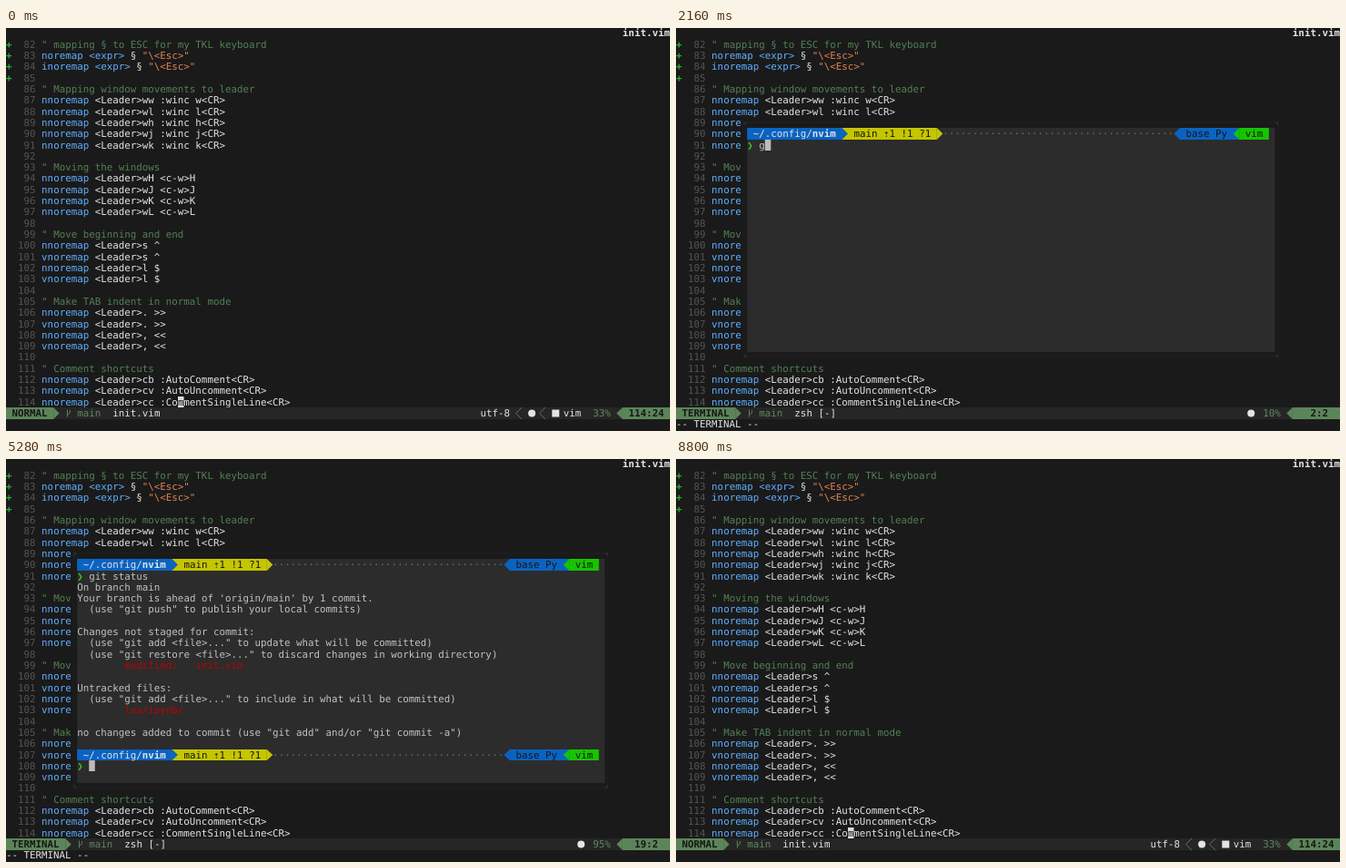
Recreate the animation shown at these times as an HTML page. Size 730 px wide and 444 px high, loop 8880 ms.

```html
<!DOCTYPE html>
<html lang="en">
<head>
<meta charset="utf-8">
<title>Popup terminal in an editor</title>
<style>
html, body { margin: 0; width: 100%; height: 100%; overflow: hidden; background: #1a1a1a; }
svg { display: block; width: 730px; height: 444px; }
text {
  font: 10.827px "DejaVu Sans Mono", "Liberation Mono", monospace;
  white-space: pre;
  text-rendering: geometricPrecision;
  fill: #e4e4e4;
}
.num { fill: #545454; }
.comment { fill: #538053; }
.key { fill: #5fafff; }
.str { fill: #e08255; }
.sign { fill: #2fae2f; font-weight: 700; }
.green { fill: #5f875f; }
.bold { font-weight: 700; }
.dark { fill: #161616; }
.out { fill: #c2c2c2; }
.red { fill: #c00000; }
.dots { fill: #6c6c6c; }
.chevron { fill: #3fc81c; font-weight: 700; }
</style>
</head>
<body>
<svg id="stage" viewBox="0 0 730 444" xmlns="http://www.w3.org/2000/svg"></svg>
<script>
// Text grid: cell width, row pitch, top of row 0 and its baseline
const LOOP = 8880, CW = 730 / 112, RH = 12.31, TOP = -.3, BASE = 9.44;
const BG = '#1a1a1a', BAR = '#262626', MOSS = '#5b8559';
const BLUE = '#0a63c2', YELLOW = '#c5c500', LIME = '#16c400', PANEL = '#2c2c2c';

// Key moments in ms
const OPEN = 1040, PROMPT = 1280, INSERT = 1600, TYPE = 2160, KEY = 160,
      ENTER = 3760, OUTPUT = 3840, REFRESH = 4320, CLOSE = 5680;

const esc = s => s.replace(/&/g, '&amp;').replace(/</g, '&lt;');
const x = col => (col * CW).toFixed(2);
const y = row => Math.round(row * RH + TOP);
const mid = row => (y(row) + y(row + 1)) / 2;

const span = (s, cls) => `<tspan class="${cls}">${esc(s)}</tspan>`;
const line = (row, col, inner, cls = '') =>
  `<text x="${x(col)}" y="${Math.round(row * RH + BASE)}" class="${cls}">${inner}</text>`;
const put = (row, col, s, cls) => line(row, col, esc(s), cls);
const box = (row, col, cols, rows, fill) =>
  `<rect x="${x(col)}" y="${y(row)}" width="${x(cols)}" height="${y(row + rows) - y(row)}" fill="${fill}"/>`;
const wedge = (row, base, tip) =>
  `M${x(base)} ${y(row)}L${x(tip)} ${mid(row)}L${x(base)} ${y(row + 1)}`;
const arrowRight = (row, col, fill) => `<path d="${wedge(row, col, col + 1)}z" fill="${fill}"/>`;
const arrowLeft = (row, col, fill) => `<path d="${wedge(row, col + 1, col)}z" fill="${fill}"/>`;
const thinLeft = (row, col) =>
  `<path d="${wedge(row, col + 1, col)}" fill="none" stroke="${MOSS}" stroke-width=".9"/>`;
const group = (id, inner) => `<g id="${id}">${inner}</g>`;

const source = `" mapping § to ESC for my TKL keyboard
noremap <expr> § "\\<Esc>"
inoremap <expr> § "\\<Esc>"

" Mapping window movements to leader
nnoremap <Leader>ww :winc w<CR>
nnoremap <Leader>wl :winc l<CR>
nnoremap <Leader>wh :winc h<CR>
nnoremap <Leader>wj :winc j<CR>
nnoremap <Leader>wk :winc k<CR>

" Moving the windows
nnoremap <Leader>wH <c-w>H
nnoremap <Leader>wJ <c-w>J
nnoremap <Leader>wK <c-w>K
nnoremap <Leader>wL <c-w>L

" Move beginning and end
nnoremap <Leader>s ^
vnoremap <Leader>s ^
nnoremap <Leader>l $
vnoremap <Leader>l $

" Make TAB indent in normal mode
nnoremap <Leader>. >>
vnoremap <Leader>. >>
nnoremap <Leader>, <<
vnoremap <Leader>, <<

" Comment shortcuts
nnoremap <Leader>cb :AutoComment<CR>
nnoremap <Leader>cv :AutoUncomment<CR>
nnoremap <Leader>cc :CommentSingleLine<CR>`.split('\n');

function paintCode(s) {
  if (s[0] === '"') return span(s, 'comment');
  return s.split(/(^\w+|<expr>|".*")/).map(part =>
    part[0] === '"' ? span(part, 'str')
      : /^(\w*noremap|<expr>)$/.test(part) ? span(part, 'key')
      : esc(part)).join('');
}

function editor() {
  const rows = source.map((s, i) =>
    (i < 4 ? put(i + 1, 0, '+', 'sign') : '') +
    put(i + 1, 2, String(82 + i).padStart(3), 'num') +
    line(i + 1, 6, paintCode(s)));
  return put(0, 104, 'init.vim', 'bold') + rows.join('');
}

const branch = col => {
  const cx = (col + .35) * CW, top = y(34);
  return `<path d="M${cx} ${top + 2.5}v8M${cx + 3} ${top + 3}v2q0 1.5 -3 3" fill="none" stroke="${MOSS}"/>`;
};
const badge = col =>
  `<circle cx="${x(col + .7)}" cy="${mid(34)}" r="4" fill="#e4e4e4"/>`;

function status(mode, file, percent, extra) {
  const w = mode.length + 2;
  return box(34, 0, 112, 1, BAR) + box(34, 0, w, 1, MOSS) + arrowRight(34, w, MOSS) +
    put(34, 1, mode, 'bold dark') + branch(w + 2) + put(34, w + 4, 'main', 'green') +
    put(34, w + 10, file) + extra + put(34, 99, percent, 'green') +
    box(34, 104, 8, 1, MOSS) + arrowLeft(34, 103, MOSS);
}

const fileInfo = put(34, 80, 'utf-8') + thinLeft(34, 86) + badge(88) + thinLeft(34, 90) +
  `<rect x="${x(92.1)}" y="${mid(34) - 4}" width="8" height="8" fill="#e4e4e4"/>` + put(34, 94, 'vim');

function prompt(row, full) {
  const from = full ? 45 : 29, to = full ? 84 : 94;
  const git = box(row, 28, 16, 1, YELLOW) + arrowRight(row, 44, YELLOW) +
    put(row, 30, 'main ⇡1 !1 ?1', 'dark') +
    arrowLeft(row, 84, BLUE) + box(row, 85, 10, 1, BLUE) + put(row, 86, 'base Py', 'dark');
  return put(row, from, '·'.repeat(to - from), 'dots') + (full ? git : '') +
    box(row, 12, 16, 1, BLUE) + arrowRight(row, 28, BLUE) +
    line(row, 13, '~/.config/' + span('nvim', 'bold')) +
    arrowLeft(row, 94, LIME) + box(row, 95, 5, 1, LIME) + put(row, 96, 'vim', 'dark') +
    put(row + 1, 12, '❯', 'chevron');
}

function frame() {
  const l = 11.5 * CW, r = 101.5 * CW, t = mid(8), b = mid(29) - 1;
  return box(8, 11, 91, 22, BG) + box(9, 12, 89, 20, PANEL) +
    `<rect x="${l}" y="${t}" width="${r - l}" height="${b - t}" rx="2" fill="none" stroke="#202020"/>` +
    `<path d="M${l} ${t + 3}v-3h3M${r - 3} ${t}h3v3M${l} ${b - 3}v3h3M${r - 3} ${b}h3v-3" fill="none" stroke="#3c3c3c" stroke-width=".8"/>`;
}

const report = `On branch main
Your branch is ahead of 'origin/main' by 1 commit.
  (use "git push" to publish your local commits)

Changes not staged for commit:
  (use "git add <file>..." to update what will be committed)
  (use "git restore <file>..." to discard changes in working directory)
        modified:   init.vim

Untracked files:
  (use "git add <file>..." to include in what will be committed)
        lua/ipynb/

no changes added to commit (use "git add" and/or "git commit -a")`.split('\n');

const output = report.map((s, i) => put(11 + i, 12, s, /^ {8}/.test(s) ? 'red' : 'out')).join('');

const stage = document.getElementById('stage');
stage.innerHTML = `<rect width="730" height="444" fill="${BG}"/>` + editor() +
  group('fileCursor', box(33, 29, 1, 1, '#dedede') + put(33, 29, 'm', 'dark')) +
  group('popup', frame() +
    group('barePrompt', prompt(9, false)) +
    group('fullPrompt', prompt(9, true)) +
    put(10, 14, '', 'out').replace('<text', '<text id="typed"') +
    group('result', output + prompt(26, true)) +
    group('termCursor', box(0, 0, 1, 1, '#bcbcbc'))) +
  group('fileBar', status('NORMAL', 'init.vim', '33%', fileInfo)) +
  group('shellBar', status('NORMAL', 'zsh [-]', 'Top', badge(96.3))) +
  group('termBar', status('TERMINAL', 'zsh [-]', '10%', badge(96.3))) +
  group('endBar', status('TERMINAL', 'zsh [-]', '95%', badge(96.3))) +
  put(34, 105, '', 'bold dark').replace('<text', '<text id="place"') +
  group('command', put(35, 0, ':PopTerminal')) +
  group('modeNote', put(35, 0, '-- TERMINAL --'));

const el = id => document.getElementById(id);
const spans = {
  popup: [OPEN, CLOSE], barePrompt: [OPEN, PROMPT], fullPrompt: [PROMPT, CLOSE],
  result: [OUTPUT, CLOSE], shellBar: [OPEN, INSERT], termBar: [INSERT, REFRESH],
  endBar: [REFRESH, CLOSE], command: [OPEN, INSERT], modeNote: [INSERT, CLOSE]
};
const layers = Object.entries(spans).map(([id, [from, to]]) => ({ node: el(id), from, to }));
const typed = el('typed'), place = el('place'), termCursor = el('termCursor');
const COMMAND = 'git status';
const keysAt = t => Math.max(0, Math.min(COMMAND.length, Math.floor((t - TYPE) / KEY) + 1));

function position(t) {
  if (t < OPEN || t >= CLOSE) return '114:24';
  if (t < INSERT) return '  1:1';
  if (t >= REFRESH) return ' 19:2';
  return '  2:' + (2 + keysAt(t - 80));
}

function cursorCell(t, keys) {
  if (t < INSERT) return [9, 12];
  if (t < ENTER) return [10, 14 + keys];
  return t < OUTPUT ? [11, 12] : [27, 14];
}

function draw(now) {
  const t = now % LOOP, open = t >= OPEN && t < CLOSE, keys = keysAt(t);
  for (const { node, from, to } of layers)
    node.style.display = t >= from && t < to ? '' : 'none';
  el('fileCursor').style.display = el('fileBar').style.display = open ? 'none' : '';
  typed.textContent = COMMAND.slice(0, keys);
  place.textContent = position(t);
  const [row, col] = cursorCell(t, keys);
  termCursor.setAttribute('transform', `translate(${x(col)} ${y(row)})`);
}

const start = performance.now();
function tick() {
  draw(performance.now() - start);
  requestAnimationFrame(tick);
}
tick();
</script>
</body>
</html>
```
